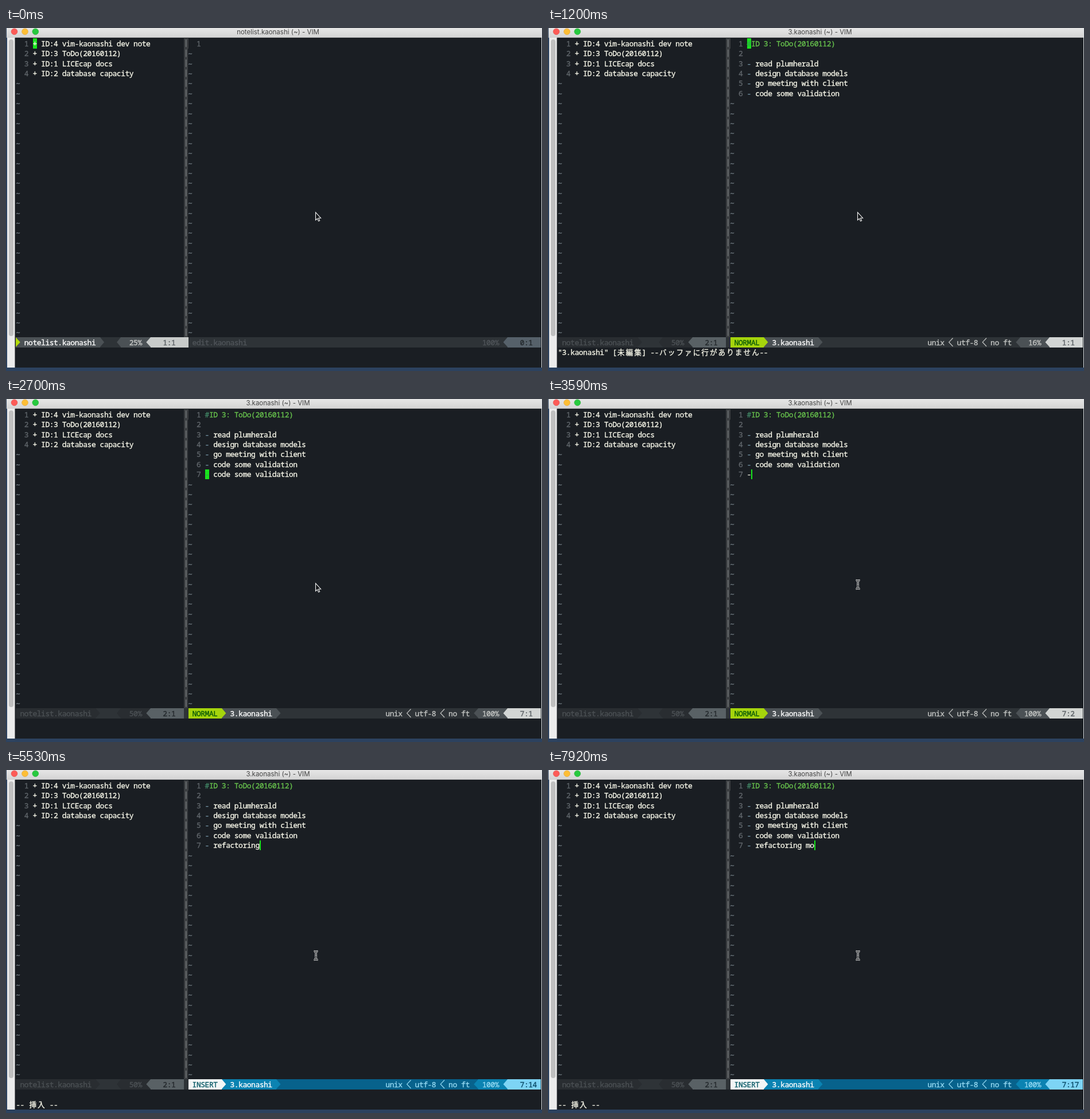
Write an HTML page with a canvas that moves like this. It is 934x599 px and loops after 8000 ms.

```html
<!DOCTYPE html>
<html lang="en">
<head>
<meta charset="utf-8">
<title>Editor session</title>
<style>
html, body { margin: 0; width: 100%; height: 100%; overflow: hidden; background: #2c425f; }
canvas { display: block; }
</style>
</head>
<body>
<canvas id="stage" width="934" height="599"></canvas>
<script>
const ctx = document.getElementById('stage').getContext('2d');
const LOOP = 8000, X0 = 17.4, Y0 = 18.2, CW = 7.32, RH = 17.4;
const LEFT = 0, SPLIT = 40, RIGHT = 41, END = 125, STATUS = 30;
const MONO = '13px "Noto Sans Mono", "DejaVu Sans Mono", monospace';
const CJK = '12.6px "Noto Sans CJK JP", "Noto Sans CJK", sans-serif';
const BG = '#1a1e23', INK = '#f6f6e8', DIM = '#50555a', NUMBER = '#60666b', CURSOR = '#18e41c';
const MESSAGE = '"3.kaonashi" [未編集] --バッファに行がありません--';

const notes = ['ID:4 vim-kaonashi dev note', 'ID:3 ToDo(20160112)', 'ID:1 LICEcap docs', 'ID:2 database capacity'];
const todo = ['#ID 3: ToDo(20160112)', '', '- read plumherald', '- design database models',
  '- go meeting with client', '- code some validation'];

const themes = {
  NORMAL: { tag: '#a5d40c', tagInk: '#0c5a08', seg: '#4b5155', bar: '#2e3337', ink: '#c4c6c4', pos: '#d2d5d4', posInk: '#5a6064' },
  'V-LINE': { tag: '#ee8412', tagInk: '#870c00', seg: '#565c60', bar: '#2e3337', ink: '#c4c6c4', pos: '#d2d5d4', posInk: '#5a6064' },
  INSERT: { tag: '#f2f6f6', tagInk: '#0d5c68', seg: '#0b83b2', bar: '#07628c', ink: '#95daf3', pos: '#7dd4f5', posInk: '#0b4c68' }
};

// Each step changes only the listed fields of the state before it.
const steps = [
  { at: 0, title: 'notelist.kaonashi', noteRow: 0, active: 'left', lines: [''], extra: null,
    row: 0, col: 0, mode: 'NORMAL', pct: '100%', pos: '0:1', cursor: 'block', msg: '', hint: '', pointer: 'arrow' },
  { at: 300, noteRow: 1 },
  { at: 1050, title: '3.kaonashi', active: 'right', msg: MESSAGE },
  { at: 1200, lines: todo, pct: '16%', pos: '1:1' },
  { at: 1500, row: 1, pct: '33%', pos: '2:1' },
  { at: 1800, row: 5, pct: '100%', pos: '6:1' },
  { at: 2400, mode: 'V-LINE', hint: '-- ビジュアル 行 --' },
  { at: 2550, mode: 'NORMAL', msg: '', hint: '' },
  { at: 2700, extra: '- code some validation', row: 6, pos: '7:1' },
  { at: 3000, col: 1, pos: '7:2' },
  { at: 3590, extra: '-', cursor: 'bar', pointer: 'beam' },
  { at: 3740, mode: 'INSERT', hint: '-- 挿入 --' },
  ...[[4030, 're'], [4330, 'ref'], [4480, 'refa'], [4630, 'refac'], [4930, 'refact'], [5080, 'refacto'],
    [5230, 'refactor'], [5380, 'refactori'], [5530, 'refactoring'], [6270, 'refactoring ']].map(typed),
  { at: 7020, cursor: 'off' },
  { at: 7170, cursor: 'bar' },
  { at: 7620, cursor: 'off' },
  typed([7920, 'refactoring mo'])
];

function typed([at, word]) {
  const extra = '- ' + word;
  return { at, extra, col: extra.length, pos: '7:' + (extra.length + 1), cursor: 'bar' };
}

const stateAt = t => Object.assign({}, ...steps.filter(s => s.at <= t));
const cx = c => X0 + c * CW;
const ry = r => Y0 + r * RH;

function rect(x, y, w, h, color) {
  ctx.fillStyle = color;
  ctx.fillRect(x, y, w, h);
}

function cells(c, r, n, color) {
  const x = Math.round(cx(c)), y = Math.round(ry(r));
  rect(x, y, Math.round(cx(c + n)) - x, Math.round(ry(r + 1)) - y, color);
}

// Terminal grid text: wide characters take two cells; a hairline stroke adds weight.
function text(str, c, r, color) {
  ctx.fillStyle = ctx.strokeStyle = color;
  ctx.lineWidth = 0.35;
  ctx.textAlign = 'center';
  for (const ch of str) {
    const wide = ch > '\u2fff' ? 2 : 1, x = cx(c + wide / 2), y = ry(r) + 13.6;
    ctx.font = wide === 2 ? CJK : MONO;
    ctx.fillText(ch, x, y);
    ctx.strokeText(ch, x, y);
    c += wide;
  }
}

function shape(points, color, stroke, width = 1) {
  ctx.beginPath();
  points.forEach(([x, y]) => ctx.lineTo(x, y));
  ctx.closePath();
  ctx.fillStyle = color;
  ctx.fill();
  if (stroke) {
    ctx.strokeStyle = stroke;
    ctx.lineWidth = width;
    ctx.stroke();
  }
}

// Status-line wedge in one cell; dir 1 points right, -1 points left.
function wedge(c, dir, color) {
  const base = Math.round(cx(dir > 0 ? c : c + 1)), tip = cx(dir > 0 ? c + 1 : c);
  shape([[base, 540], [tip, 548.7], [base, 557]], color);
}

function chevron(c, color) {
  ctx.strokeStyle = color;
  ctx.lineWidth = 1.2;
  ctx.beginPath();
  ctx.moveTo(cx(c + 1), 541.5);
  ctx.lineTo(cx(c) + 0.5, 548.7);
  ctx.lineTo(cx(c + 1), 556);
  ctx.stroke();
}

function disc(x, color, edge) {
  ctx.beginPath();
  ctx.arc(x, 6.3, 5.4, 0, Math.PI * 2);
  ctx.fillStyle = color;
  ctx.fill();
  ctx.strokeStyle = edge;
  ctx.lineWidth = 0.6;
  ctx.stroke();
}

function drawWindow(title) {
  rect(0, 0, 934, 599, '#2c425f');
  rect(2, 10, 14, 583, '#ececec');
  rect(15.5, 17, 917.5, 576, BG);
  rect(933, 0, 1, 593, '#d9dde0');
  const bar = ctx.createLinearGradient(0, 0, 0, 17);
  bar.addColorStop(0, '#e6e6e6');
  bar.addColorStop(1, '#d3d3d3');
  rect(1, 0, 932, 17, bar);
  rect(16, 16, 917, 1, '#b4b4b4');
  disc(14.5, '#fc5b57', '#df4744');
  disc(33, '#fdbe35', '#dea034');
  disc(51.3, '#27c93f', '#1dab2d');
  ctx.fillStyle = '#c0c0c0';
  ctx.beginPath();
  ctx.roundRect(5, 20, 8, 518, 4);
  ctx.fill();
  ctx.font = '11.5px Inter, "Open Sans", sans-serif';
  ctx.textAlign = 'center';
  ctx.fillStyle = '#444';
  ctx.fillText(title + ' (~) - VIM', 474, 11);
}

function drawTildes(c, from) {
  for (let r = from; r < STATUS; r++) text('~', c, r + 0.06, '#707b82');
}

function drawSplit() {
  cells(SPLIT, 0, 1, '#3b3e41');
  rect(310, 18, 7, 522, '#3b3e41');
  for (let r = 0; r < STATUS; r++) rect(313, ry(r) + 2, 1.4, 13, '#777b7d');
}

function drawNotes(s) {
  notes.forEach((note, r) => {
    const here = s.active === 'left' && r === s.noteRow;
    if (here) cells(LEFT + 4, r, 1, CURSOR);
    text(String(r + 1), LEFT + 2, r, NUMBER);
    text('+ ' + note, LEFT + 4, r, INK);
  });
  drawTildes(LEFT, notes.length);
}

function drawLine(line, r) {
  const c = RIGHT + 4;
  if (line[0] === '#') {
    text('#', c, r, '#438a68');
    text(line.slice(1), c + 1, r, '#66c04c');
  } else if (line.startsWith('- ')) {
    text('-', c, r, '#7596a8');
    text(line.slice(2), c + 2, r, INK);
  } else {
    text(line, c, r, INK);
  }
}

function drawBuffer(s) {
  const lines = s.extra === null ? s.lines : [...s.lines, s.extra], c = RIGHT + 4;
  if (s.mode === 'V-LINE') cells(c, s.row, lines[s.row].length + 1, '#3c4145');
  lines.forEach((line, r) => {
    text(String(r + 1), RIGHT + 2, r, NUMBER);
    drawLine(line, r);
  });
  drawTildes(RIGHT, lines.length);
  if (s.active !== 'right') return;
  if (s.cursor === 'block') {
    cells(c + s.col, s.row, 1, CURSOR);
    text(lines[s.row][s.col] || '', c + s.col, s.row, '#2cac44');
  } else if (s.cursor === 'bar') {
    rect(Math.round(cx(c + s.col)), Math.round(ry(s.row)), 2, 17, CURSOR);
  }
}

function drawLeftStatus(s) {
  const on = s.active === 'left';
  const seg = on ? '#4b5155' : '#292d31', ink = on ? '#c9cbc9' : '#4c5155';
  const pos = on ? '#c8cbca' : '#596165';
  const edge = on ? 20 : 19;
  cells(0, STATUS, SPLIT + 1, '#2e3337');
  cells(0, STATUS, edge, seg);
  wedge(edge, 1, seg);
  wedge(24, -1, seg);
  cells(25, STATUS, 7, seg);
  wedge(31, -1, pos);
  cells(32, STATUS, on ? 9 : 8, pos);
  if (on) wedge(0, 1, '#b4dc0a');
  text('notelist.kaonashi', on ? 2 : 1, STATUS, on ? '#fff' : ink);
  text((s.noteRow + 1) * 25 + '%', 27, STATUS, ink);
  text(s.noteRow + 1 + ':1', 35, STATUS, on ? '#5a6064' : '#23282c');
}

function drawRightStatus(s) {
  const on = s.active === 'right', k = themes[s.mode];
  const pos = on ? k.pos : '#56616a';
  cells(RIGHT, STATUS, END - RIGHT, on ? k.bar : '#2e3337');
  if (on) {
    cells(RIGHT, STATUS, 8, k.tag);
    cells(49, STATUS, 13, k.seg);
    wedge(49, 1, k.tag);
    wedge(62, 1, k.seg);
    text(s.mode, RIGHT + 1, STATUS, k.tagInk);
    text('3.kaonashi', 51, STATUS, '#fff');
    text('unix', 88, STATUS, k.ink);
    chevron(93, k.ink);
    text('utf-8', 95, STATUS, k.ink);
    chevron(101, k.ink);
    text('no ft', 103, STATUS, k.ink);
    wedge(109, -1, k.seg);
    cells(110, STATUS, 7, k.seg);
  } else {
    text('edit.kaonashi', RIGHT + 1, STATUS, DIM);
  }
  wedge(116, -1, pos);
  cells(117, STATUS, END - 117, pos);
  text(s.pct.padStart(4), 111, STATUS, on ? k.ink : DIM);
  text(s.pos, 120, STATUS, on ? k.posInk : '#23282c');
}

function drawPointer(kind) {
  if (kind === 'arrow') {
    shape([[539.5, 322], [539.5, 335.5], [542.4, 332.8], [544.6, 337.4], [546.6, 336.5], [544.5, 332], [548.6, 332]],
      '#15181b', '#f4f4f4', 1.1);
    return;
  }
  const beam = (color, width) => {
    ctx.strokeStyle = color;
    ctx.lineWidth = width;
    ctx.beginPath();
    for (const d of [-1, 1]) {
      ctx.moveTo(536.5, 324 + d * 7.5);
      ctx.quadraticCurveTo(540, 324 + d * 7.5, 540, 324 + d * 5);
      ctx.quadraticCurveTo(540, 324 + d * 7.5, 543.5, 324 + d * 7.5);
    }
    ctx.moveTo(540, 318);
    ctx.lineTo(540, 330);
    ctx.moveTo(538, 326.5);
    ctx.lineTo(542, 326.5);
    ctx.stroke();
  };
  beam('#e8e8e8', 3.2);
  beam('#15181b', 1.2);
}

function draw(t) {
  const s = stateAt(t);
  drawWindow(s.title);
  drawNotes(s);
  drawSplit();
  drawBuffer(s);
  drawLeftStatus(s);
  drawRightStatus(s);
  text(s.msg, 0, STATUS + 1, INK);
  text(s.hint, 0, STATUS + 2, INK);
  drawPointer(s.pointer);
}

const start = performance.now();
function tick() {
  draw((performance.now() - start) % LOOP);
  requestAnimationFrame(tick);
}
tick();
</script>
</body>
</html>
```
